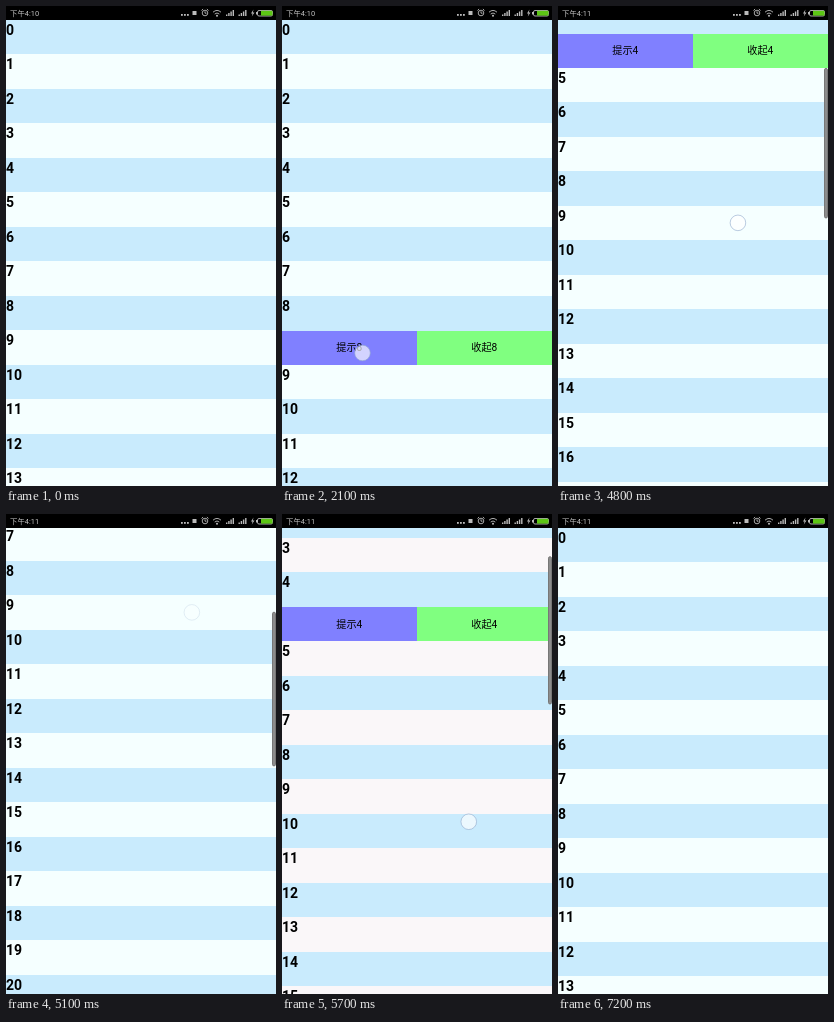
An HTML page for the animation above (9.2 s loop, 270 by 480 pixels).

```html
<!DOCTYPE html>
<html lang="zh">
<head>
<meta charset="utf-8">
<style>
  html, body { margin: 0; width: 100%; height: 100%; overflow: hidden; }
  svg { display: block; width: 270px; height: 480px; }
  text { font-family: Roboto, "Noto Sans CJK SC", "Noto Sans CJK", sans-serif; }
  .num { font-weight: bold; font-size: 14px; }
  .btn { font-size: 10.2px; text-anchor: middle; }
  .line { fill: none; stroke: #bbb; stroke-width: .9; }
</style>
</head>
<body>
<svg viewBox="0 0 270 480">
  <g id="list"></g>
  <rect id="bar" x="266.5" width="3" rx="1.5" fill="#8c8c8c" stroke="#777"/>
  <g id="toast">
    <rect x="115" y="406" width="40" height="30" rx="6" fill="#555b5c"/>
    <text x="135" y="424.5" font-size="8.2" text-anchor="middle" fill="#f4f4f4">提示8</text>
  </g>
  <circle id="dot" r="7.8" fill="#fff" fill-opacity=".65" stroke="#90a8cc" stroke-opacity=".6"/>
  <rect width="270" height="14"/>
  <text id="clock" x="4" y="10" font-size="7.4" fill="#c4c4c4"></text>
  <g id="status" fill="#bbb">
    <rect x="186.5" y="5" width="4" height="4"/>
    <circle cx="211" cy="9.8" r="1"/>
    <path d="M247.5 3.5l-2.5 4h1.6l-.8 3 2.7-4h-1.7z"/>
    <path d="M250 6h2v2.5h-2z"/>
  </g>
  <g class="line">
    <circle cx="199" cy="7" r="2.8"/>
    <path d="M199 5.3V7.2h1.5M195.5 4.5l1.6-1.5M202.5 4.5l-1.6-1.5M207 6.2q4-3.6 8 0M208.7 8q2.3-2 4.6 0"/>
    <rect x="251.5" y="4.5" width="15" height="5.5" rx="1.5"/>
  </g>
  <rect x="255" y="4.8" width="11.5" height="4.8" fill="#5cc614"/>
</svg>
<script>
const LOOP = 9200, STEP = 100, ROW = 34.5, TOP = 14, COUNT = 26;
const $ = id => document.getElementById(id);

function set(el, attrs) {
  for (const k in attrs) el.setAttribute(k, attrs[k]);
  return el;
}

function add(parent, tag, attrs = {}, label = "") {
  const el = set(document.createElementNS("http://www.w3.org/2000/svg", tag), attrs);
  el.textContent = label;
  parent.append(el);
  return el;
}

// Drawers sit behind the rows and show in the gap that opens.
function drawer(n) {
  const g = add($("list"), "g");
  [["提示", "#8080ff"], ["收起", "#80ff80"]].forEach(([word, fill], i) => {
    add(g, "rect", { x: 135 * i, width: 135, height: 35, fill });
    add(g, "text", { x: 135 * i + 67.3, y: 21, class: "btn" }, word + n);
  });
  return g;
}

const drawers = [4, 8].map(n => ({ n, g: drawer(n) }));
const rows = Array.from({ length: COUNT }, (_, i) => {
  const g = add($("list"), "g");
  const bg = add(g, "rect", { width: 270, height: 35 });
  add(g, "text", { y: 15, class: "num" }, i);
  return { g, bg };
});

for (let i = 0; i < 4; i++) {
  const h = 1.5 + 1.5 * i;
  if (i < 3) add($("status"), "rect", { x: 175 + 3 * i, y: 8, width: 1.8, height: 1.8 });
  for (const x of [220, 232.5])
    add($("status"), "rect", { x: x + 2.2 * i, y: 10 - h, width: 1.4, height: h });
}

// Smooth step from 0 to 1 between two times.
function ease(t, from, to) {
  const k = Math.min(1, Math.max(0, (t - from) / (to - from)));
  return k * k * (3 - 2 * k);
}
const pulse = (t, a, b, c, d) => ease(t, a, b) - ease(t, c, d);

const touches = [
  { from: 1000, to: 1400, x: 100, y: 308 },
  { from: 2100, to: 2500, x: 80.5, y: 347 },
  { from: 3400, to: 3900, x: 182, y: 173 },
  { from: 4300, to: 5200, x: 172, y: 375.5, dx: 15, dy: -300, stop: 5263 },
  { from: 5300, to: 6200, x: 226.6, y: 101.2, dx: -65.7, dy: 340.6, stop: 6000 },
  { from: 6800, to: 7200, x: 205, y: 207 }
];

// The list follows the finger and stops at its top edge.
const scrollAt = t => Math.max(0, touches.reduce(
  (sum, { from, stop, dy = 0 }) => dy ? sum - dy * ease(t, from, stop) : sum, 0));

const move = (el, y) => set(el, { transform: `translate(0 ${Math.floor(y)})` });

function draw(t) {
  const scroll = scrollAt(t);
  const gap = { 4: pulse(t, 3500, 3800, 7000, 7200), 8: pulse(t, 1000, 1300, 3500, 3800) };
  const pale = t < 5300 || t >= 7000 ? "#f5ffff" : t < 5800 ? "#faf7f9" : "#fff";
  const rowY = i => TOP - scroll + ROW * (i + (i > 4) * gap[4] + (i > 8) * gap[8]);

  rows.forEach(({ g, bg }, i) => {
    move(g, rowY(i));
    set(bg, { fill: i % 2 ? pale : "#c9ebfd" });
  });
  drawers.forEach(({ n, g }) => {
    move(g, rowY(n) + ROW);
    g.style.display = gap[n] > 0 ? "" : "none";
  });

  set($("bar"), { y: TOP + .5 + .302 * scroll, height: 144 + .035 * scroll });
  $("bar").style.opacity = pulse(t, 4300, 4400, 6200, 6700);
  $("toast").style.opacity = pulse(t, 2300, 2800, 4300, 4700);

  const touch = touches.find(({ from, to }) => t >= from && t < to);
  $("dot").style.opacity = touch ? 1 - ease(t, touch.to - 250, touch.to) : 0;
  if (touch) {
    const { from, x, y, dx = 0, dy = 0, stop = touch.to } = touch;
    const k = ease(t, from, stop);
    set($("dot"), { cx: x + dx * k, cy: y + dy * k });
  }
  $("clock").textContent = t < 3200 ? "下午4:10" : "下午4:11";
}

const start = performance.now();
function tick() {
  const t = (performance.now() - start) % LOOP;
  draw(Math.floor(t / STEP) * STEP);
  requestAnimationFrame(tick);
}
tick();
</script>
</body>
</html>
```
